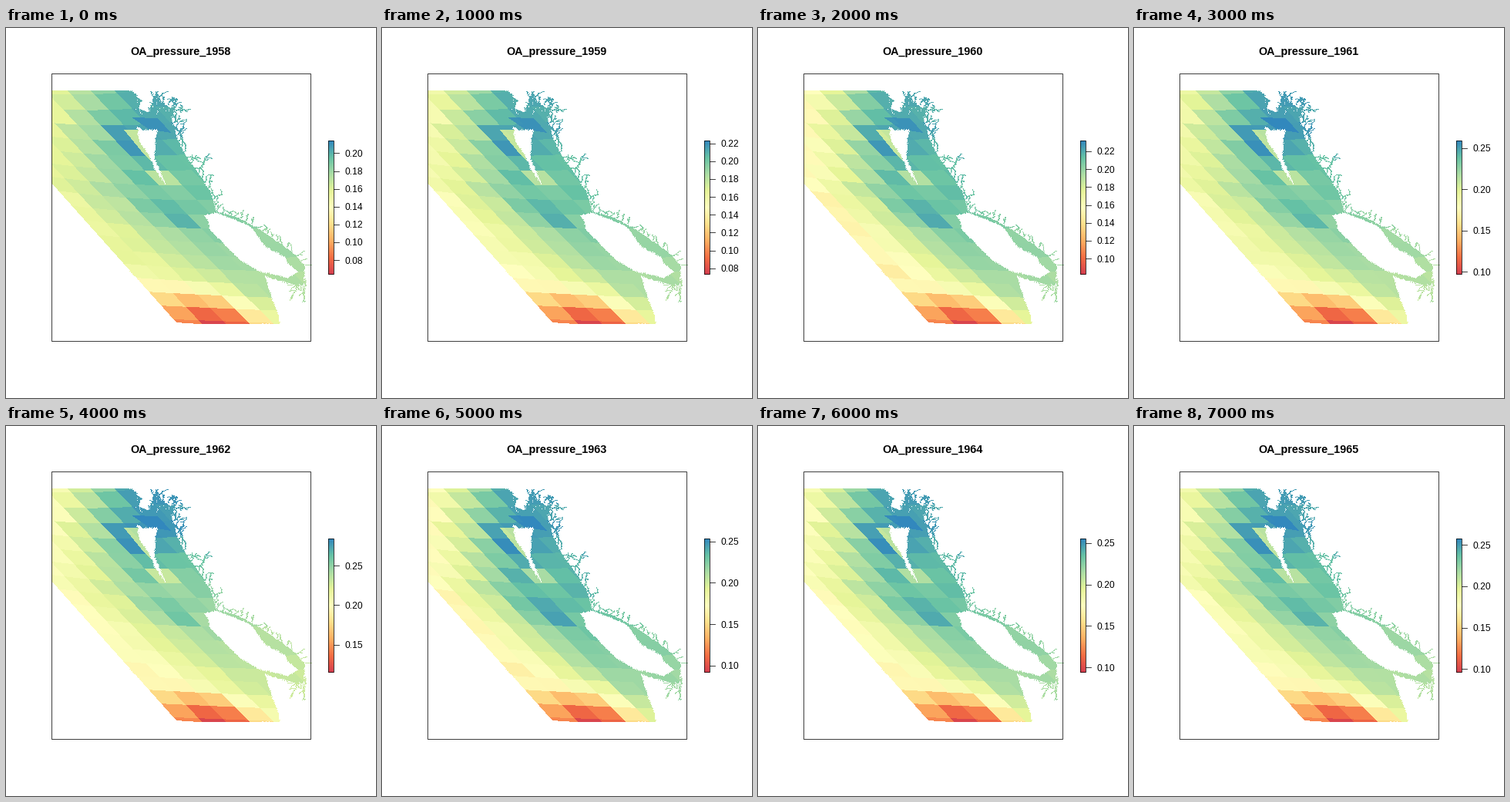
These frames come from a looping animation (480 px wide and 480 px high, 8 s). A matplotlib script:

```python
import numpy as np
import matplotlib.pyplot as plt
from matplotlib.animation import FuncAnimation
from matplotlib.colors import LinearSegmentedColormap
from matplotlib.patches import Rectangle
from matplotlib.path import Path

SIZE, DPI = 480, 100
PX = 72 / DPI  # points per pixel
FIRST_YEAR, YEAR_COUNT = 1958, 8
plt.rcParams["font.family"] = "Liberation Sans"

SPECTRAL = LinearSegmentedColormap.from_list("spectral", [
    "#D53E4F", "#F46D43", "#FDAE61", "#FEE08B", "#FFFFBF",
    "#E6F598", "#ABDDA4", "#66C2A5", "#3288BD"], N=512)

# Key years; the ones between are interpolated
KEYS = [1958, 1960, 1961, 1962, 1963, 1965]
LOW = [.0636, .0820, .0967, .1150, .0916, .0958]
HIGH = [.2142, .2320, .2593, .2840, .2533, .2575]
OPEN_SHIFT = [0, -.14, -.05, -.10, -.13, -.08]
COAST_SHIFT = [0, .02, -.01, -.05, .04, 0]

# Local highs and lows: column, row, column spread, row spread, strength
SPOTS = [(1.3, -1, 1.5, 1.9, -.65), (3.8, 7.4, .6, .6, .13),
         (5, 12.6, .5, .8, .10), (5, 10, .4, .4, -.14)]

OUTER = [(355, 384), (250, 384), (221, 382), (58, 200), (58, 81), (164, 81)]
MAINLAND = [
    (176, 95), (172, 104), (185, 110), (195, 81), (202, 96), (214, 103),
    (222, 100), (215, 116), (221, 140), (233, 165), (253, 193), (267, 215),
    (273, 238), (299, 245), (324, 258), (345, 272), (372, 291), (388, 309),
    (385, 334), (366, 331), (336, 322), (343, 345), (354, 375)]
BIG_ISLAND = [
    (257, 243), (273, 240), (308, 253), (319, 259), (336, 283), (362, 297),
    (366, 306), (379, 316), (366, 324), (326, 315), (300, 298), (284, 281),
    (265, 262), (263, 252)]
NORTH_ISLAND = [
    (170, 128), (177, 132), (197, 132), (194, 144), (193, 170), (208, 204),
    (193, 183), (184, 163), (173, 147)]
BLUE_CELL = [(163, 116), (197, 117), (214, 136), (185, 131)]
LEE = [(153, 132), (175, 132), (188, 172), (180, 165)]

rng = np.random.default_rng(7)
yy, xx = np.mgrid[0:SIZE, 0:SIZE] + .5
pixels = np.column_stack([xx.ravel(), yy.ravel()])


def inside(points):
    return Path(points).contains_points(pixels).reshape(SIZE, SIZE)


def ramp(x, lo, hi):
    return np.clip((x - lo) / (hi - lo), 0, 1)


def inlet(mask, x, y, heading, length, wobble=.28):
    """Wander inland one pixel at a time, sometimes branching."""
    for left in range(int(length), 0, -1):
        heading += rng.normal(0, wobble)
        x, y = x + np.cos(heading), y + np.sin(heading)
        if y < 82:
            return
        mask[int(y), int(x):int(x) + rng.integers(1, 3)] = True
        if left > 5 and rng.random() < .1:
            side = rng.choice([-1, 1]) * rng.uniform(.6, 1.2)
            inlet(mask, x, y, heading + side, left * .5, wobble)


def carve_coast(mask):
    """Start inlets at even steps along the mainland, heading north-east."""
    shore = np.array(MAINLAND[2:18], float)
    dist = np.r_[0, np.cumsum(np.hypot(*np.diff(shore, axis=0).T))]
    for d in np.arange(0, dist[-1], 8):
        x, y = (np.interp(d, dist, shore[:, k]) for k in (0, 1))
        reach = np.interp(y, [100, 150, 200, 240, 300], [22, 36, 28, 14, 12])
        inlet(mask, x, y, np.radians(rng.uniform(-90, -25)),
              reach * rng.uniform(.5, 1.1))
    for x in (378, 385, 388):
        inlet(mask, x, 325, np.pi / 2, 31, .12)


def roughen(mask):
    """Flip random edge pixels so that the coast looks ragged."""
    near = [np.roll(mask, s, axis) for s in (-1, 1) for axis in (0, 1)]
    edge = np.any(near, axis=0) & ~np.all(near, axis=0)
    return mask ^ (edge & (rng.random(mask.shape) < .2))


def build_sea():
    outline = inside(MAINLAND + OUTER)
    sea = roughen(outline & ~inside(BIG_ISLAND) & ~inside(NORTH_ISLAND))
    straight = (xx < 160) | ((yy > 330) & (xx < 330))
    sea = np.where(straight, outline, sea)
    carve_coast(sea)
    specks = (xx > 168) & (xx < 222) & (yy < 112)
    sea &= ~(specks & (rng.random(sea.shape) < .05))
    return sea & (yy > 81) & (yy < 384) & (xx > 59)


def grid_position():
    """Column and row of every pixel in the skewed, slightly curved grid."""
    col = np.full(xx.shape, 5.0)
    row = np.full(xx.shape, 8.0)
    for _ in range(60):
        u = np.clip(col - 5, -6, 3)
        bend = (1.2 - .06 * row) * u - .04 * row * u ** 2
        row = np.clip((384 + bend - yy) / (17 + .1 * row), -2, 18)
        col = 5 + (xx - 378 + 17.3 * row + .065 * row ** 2) / (32 - .14 * row)
    return np.clip(np.floor(col), 0, 13), np.clip(np.floor(row), -1, 17)


col, row = grid_position()
offshore = col - np.maximum(0, (row - 9) * .55)

# Values rise from the open sea to the shore, and along the shore northwards
t = ramp(row, 2, 15)
shore_value = .74 + .19 * t * t * (3 - 2 * t)
base = .62 + (shore_value - .62) * ramp(offshore, 0, 3.6)
for c, r, dc, dr, strength in SPOTS:
    base += strength * np.exp(-((col - c) / dc) ** 2 / 2
                              - ((row - r) / dr) ** 2 / 2)
noise = rng.normal(0, .015, (20, 14))
base += noise[row.astype(int) + 1, col.astype(int)]
base[inside(BLUE_CELL)] = .98
base[inside(LEE)] = .70

w_open = 1 - ramp(offshore, 0, 3.5)
w_north = (1 - w_open) * ramp(row, 9, 13)
w_coast = 1 - w_open - w_north
moving = (row >= 3) | (col >= 4)
sea = build_sea()


def limits(year):
    return np.interp(year, KEYS, LOW), np.interp(year, KEYS, HIGH)


def map_image(year):
    low, high = limits(year)
    shift = (np.interp(year, KEYS, OPEN_SHIFT) * w_open
             + np.interp(year, KEYS, COAST_SHIFT) * w_coast
             + 2 * (high - low - .152) * w_north)
    rgba = SPECTRAL(np.clip(base + shift * moving, 0, 1))
    rgba[..., 3] = sea
    return rgba


fig = plt.figure(figsize=(SIZE / DPI, SIZE / DPI), dpi=DPI, facecolor="white")
ax = fig.add_axes([0, 0, 1, 1])
ax.axis("off")

LEFT, RIGHT, TOP, BOTTOM = 418, 425, 146, 320
picture = ax.imshow(map_image(FIRST_YEAR), extent=(0, SIZE, SIZE, 0),
                    interpolation="nearest", zorder=1)
ax.imshow(np.linspace(1, 0, 174)[:, None], cmap=SPECTRAL, vmin=0, vmax=1,
          extent=(LEFT, RIGHT, BOTTOM, TOP), interpolation="nearest",
          aspect="auto", zorder=1)


def frame_box(x0, y0, x1, y1):
    ax.add_patch(Rectangle((x0, y0), x1 - x0, y1 - y0, fill=False,
                           ec="black", lw=.75 * PX, zorder=3))


frame_box(59, 59, 395, 406)
frame_box(LEFT, TOP, RIGHT, BOTTOM - 1)
title = ax.text(226.5, 35, "", ha="center", va="baseline",
                fontsize=14.4 * PX, fontweight="bold")
ticks = [(ax.plot([], [], color="black", lw=.75 * PX)[0],
          ax.text(439, 0, "", fontsize=12 * PX, va="baseline"))
         for _ in range(8)]
ax.set_xlim(0, SIZE)
ax.set_ylim(SIZE, 0)


def draw(n):
    year = FIRST_YEAR + n
    low, high = limits(year)
    step = .02 if high - low < .155 else .05
    picture.set_data(map_image(year))
    title.set_text(f"OA_pressure_{year}")
    first = int(np.ceil(low / step))
    for k, (line, label) in enumerate(ticks):
        value = (first + k) * step
        y = BOTTOM - (value - low) / (high - low) * (BOTTOM - TOP)
        line.set_data([RIGHT, RIGHT + 7], [y, y])
        label.set_position((439, y + 4.5))
        label.set_text(f"{value:.2f}")
        line.set_visible(value <= high)
        label.set_visible(value <= high)
    return []


anim = FuncAnimation(fig, draw, frames=YEAR_COUNT, interval=1000,
                     repeat=True, repeat_delay=0, blit=False)
plt.show()
```
